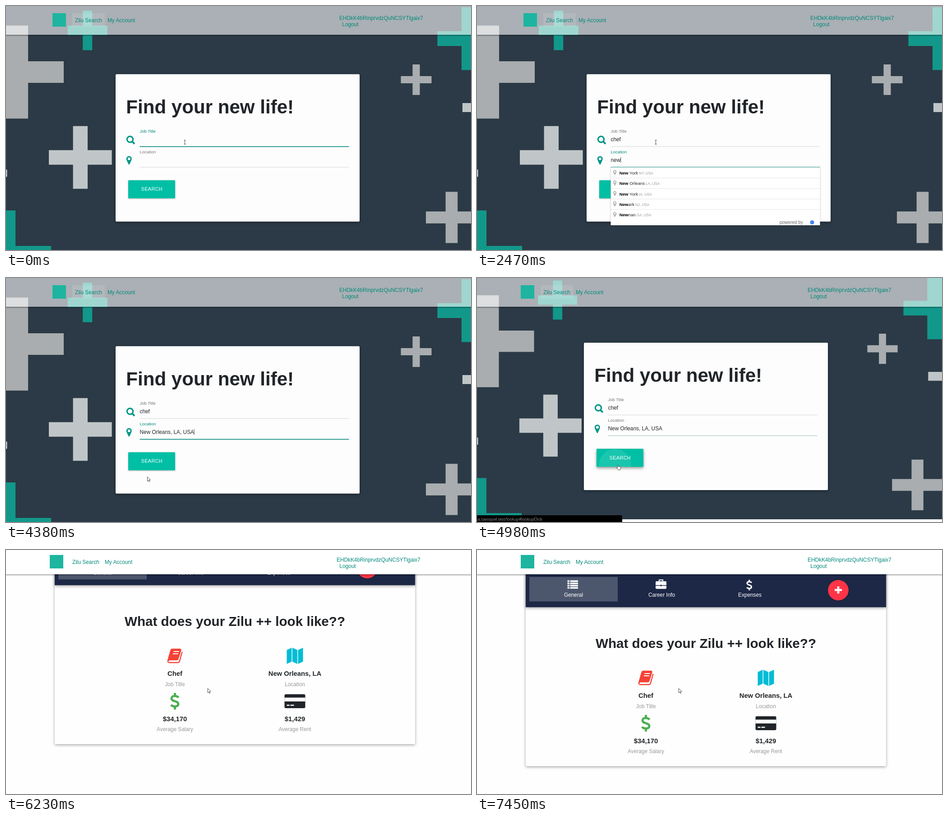
These frames come from a looping animation (1031x543 px, 8000 ms). An HTML page:

```html
<!DOCTYPE html>
<html lang="en">
<head>
<meta charset="utf-8">
<title>Job search walkthrough</title>
<style>
  html, body { margin: 0; width: 100%; height: 100%; overflow: hidden; background: #fefefe; }
  svg { display: block; width: 1031px; height: 543px; font-family: "Liberation Sans", Arial, sans-serif; }
  .card { filter: drop-shadow(0 2px 3px rgba(0, 0, 0, .35)); }
  .low { filter: drop-shadow(0 1.5px 1.5px rgba(0, 0, 0, .3)); }
  .high { filter: drop-shadow(0 3px 3px rgba(0, 0, 0, .4)); }
</style>
</head>
<body>
<svg id="stage" viewBox="0 0 1031 543"></svg>
<script>
const TEAL = '#00897b', INK = '#212529', GREY = '#a9adaf', PALE = '#c0c5c7', GREEN = '#12988a';
const BODY = 11.85, LOOP = 8000;

const rect = (x, y, w, h, fill, extra = '') =>
  `<rect x="${x}" y="${y}" width="${w}" height="${h}" fill="${fill}" ${extra}/>`;
const text = (x, y, str, size = BODY, fill = INK, extra = '') =>
  `<text x="${x}" y="${y}" font-size="${size}" fill="${fill}" ${extra}>${str}</text>`;
const centred = (x, y, str, size, fill, extra = '') =>
  text(x, y, str, size, fill, 'text-anchor="middle" ' + extra);
const group = (x, y, content, extra = '', scale = 1) =>
  `<g transform="translate(${x} ${y}) scale(${scale})" ${extra}>${content}</g>`;
const fillPath = (d, fill, extra = '') => `<path d="${d}" fill="${fill}" ${extra}/>`;
const line = (d, colour, width) => `<path d="${d}" fill="none" stroke="${colour}" stroke-width="${width}"/>`;
const BOLD = 'font-weight="700"';

// Icons
const pin = (x, y, colour, scale = 1) => group(x, y, fillPath(
  'M0 6a6 6 0 0 1 12 0c0 2.2-1 3.6-4.8 12q-1.2 1.8-2.4 0C1 9.6 0 8.2 0 6zM3 6a3 3 0 0 0 6 0a3 3 0 0 0-6 0z',
  colour, 'fill-rule="evenodd"'), '', scale);
const dollar = (x, y, colour, scale = 1) => group(x, y, line(
  'M8-8C4-13-7.5-13-7.5-6.5C-7.5 2 7.5-2 7.5 6.5C7.5 13.5-5 13-8.5 8M0-18.5v7M0 11.5v7', colour, 4.8), '', scale);
const book = (x, y) => group(x, y,
  fillPath('M-6-16H11q4 0 3 4L8 7q-1 3-4 3H-11q-3 0-4 3-2-2-1-5L-10-13q1-3 4-3z', '#f44336') +
  line('M-15 10q-2 5 3 5H7q2 0 3-2L16-9', '#f44336', 2.4) + line('M-3-9.5h12M-4.5-4.5h12', '#fff', 2.2));
const map = (x, y) => group(x, y, fillPath(
  'M-18-13L-7-18V13L-18 18zM-5.5-18L5.5-13V18L-5.5 13zM7-13L18-18V13L7 18z', '#00bcd4'));
const creditCard = (x, y) => rect(x, y, 46, 31, INK, 'rx="3"') + rect(x, y + 7.5, 46, 8.5, '#fefefe') +
  line(`M${x + 5} ${y + 24.5}h6M${x + 13} ${y + 24.5}h8`, '#fefefe', 2.6);
const list = (x, y) => [0, 5, 10, 15].map(d =>
  rect(x, y + d, 4.5, 3.6, '#fff') + rect(x + 6, y + d, 17.5, 3.6, '#fff')).join('');
const briefcase = (x, y) => rect(x, y + 4, 24, 17, '#fff', 'rx="2"') +
  line(`M${x + 8} ${y + 4}v-3h8v3`, '#fff', 2) +
  line(`M${x} ${y + 13.5}h9.5m5 0h9.5`, '#1d2846', 1.4) + rect(x + 10, y + 12, 4, 3, '#1d2846');

// Pointers
const pointers = {
  beam: 'M-2-4.5h4M0-4.5v9M-2 4.5h4',
  arrow: 'M0 0V9.6L2.2 7.6L3.7 11L5.2 10.3L3.8 7.1H6.8z',
  hand: 'M2.2 7V1q.9-1.4 1.8 0V4.6q1-.8 1.7.2 1-.6 1.6.4 1.2-.4 1.5.8V8.5L7.8 12H3.6L.4 8Q-.4 6 2.2 7z'
};
const pointer = ([kind, x, y]) =>
  group(x, y, `<path d="${pointers[kind]}" fill="#fff" stroke="#222" stroke-width=".8"/>`);

function nav(solid, dx, dy) {
  const height = 64 + 2 * dy;
  const links = (solid ? '' : rect(147, 16, 72, 30, '#fff', 'opacity=".1"')) +
    rect(103, 16, 30, 30, '#1db5a0') +
    text(153, 35.5, 'Zilu Search', BODY, TEAL) + text(225, 35.5, 'My Account', BODY, TEAL) +
    text(739, 31, 'EHDkK4bRinprvdzQuNCSYTlgaix7', BODY, TEAL) + text(745.3, 44.7, 'Logout', BODY, TEAL);
  return rect(0, 0, 1031, height, '#fff', `opacity="${solid ? 1 : .6}"`) +
    rect(0, height, 1031, 4, 'url(#fade)') + group(dx, solid ? -5 : 0, links);
}

const plus = (cx, cy, arm, half, colour) =>
  rect(cx - arm, cy - half, 2 * arm, 2 * half, colour) + rect(cx - half, cy - arm, 2 * half, 2 * arm, colour);

const backdrop = rect(0, 0, 1060, 549, '#2b3a46') +
  rect(0, 43.5, 49, 207, GREY) + rect(0, 123, 128, 48, GREY) +
  plus(180.7, 54.3, 44, 10.5, GREEN) + plus(164.8, 337, 69.8, 16.2, PALE) +
  plus(1026.5, 72.5, 70, 16.5, GREEN) + plus(909.5, 164, 34, 8, GREY) +
  plus(988, 470.5, 57, 13.3, GREY) + rect(1012, 216, 40, 20, PALE) + rect(0, 364, 2.5, 16, PALE) +
  rect(0, 455, 21, 94, GREEN) + rect(0, 534, 100, 15, GREEN);

function field(y, label, value, focused, settling) {
  const underline = focused ? rect(296.5, y + 33, 464, 1.8, '#1f9488')
    : rect(296.5, y + 33.2, 464, 1, settling ? '#8fbdb8' : '#d6d6d6');
  return text(296.5, y + 3.3, label, 9.45, focused ? TEAL : '#757575') + text(296.5, y + 22, value) + underline;
}

// Suggestion rows: place, region
const early = [['New York', 'NY'], ['Newark', 'NJ'], ['New Orleans', 'LA'], ['Newport Beach', 'CA'], ['Nevada', 'IA']];
const later = [['New York', 'NY'], ['New Orleans', 'LA'], ['New York', 'IA'], ['Newark', 'NJ'], ['Newnan', 'GA']];

function suggestions(rows, typed, chosen) {
  const items = rows.map(([place, region], i) => {
    const y = 359.5 + 23.35 * i, on = i === chosen;
    return (on ? rect(297, y, 463, 23.3, '#ebf2fe') : '') + (i ? rect(297, y - .5, 463, 1, '#e4e4e4') : '') +
      pin(302, y + 5.5, on ? '#f04a50' : '#b3b3b3', .6) +
      text(315.8, y + 15.3, `<tspan font-weight="700" fill="#000">${place.slice(0, typed)}</tspan>` +
        `<tspan>${place.slice(typed)}</tspan><tspan dx="2" font-size="8.15" fill="#999">${region}, USA</tspan>`, 9.63);
  }).join('');
  return rect(296.5, 359, 464, 129, '#fff', 'class="low"') + items +
    text(671, 485.3, 'powered by', 10, '#666') + '<circle cx="743" cy="481.5" r="4.5" fill="#4285f4"/>';
}

function searchPage(s) {
  const left = s.clicked ? -6 : 0, up = s.clicked ? -7.8 : 0;
  const form = rect(243, 151.7, 541, 328, '#fdfdfd', 'rx="2" class="card"') +
    text(266.3, 238.8, 'Find your new life!', 42.1, INK, BOLD) +
    '<circle cx="275" cy="296.8" r="6.6" fill="none" stroke="#009688" stroke-width="3.2"/>' +
    line('M279.8 301.6l5.2 5.2', '#009688', 3.8) + pin(266.8, 334, '#009688') +
    field(279, 'Job Title', s.job || '', s.focus === 1) +
    field(325, 'Location', s.place || '', s.focus === 2, s.clicked) +
    (s.caret ? rect(s.caret - .4, s.focus === 1 ? 290 : 336, .8, 13, '#333') : '') +
    rect(271, 387.7, 104, 40.3, '#00bfa5', `rx="1.5" class="${s.clicked ? 'high' : 'low'}"`) +
    (s.clicked ? '<circle cx="312" cy="424.5" r="36" fill="#fff" opacity=".1" clip-path="url(#button)"/>' : '') +
    text(299.5, 411.4, 'SEARCH', 10.9, '#fff', 'letter-spacing=".37"') +
    (s.rows ? suggestions(s.rows, s.typed, s.chosen) : '');
  const behind = s.clicked
    ? group(0, -4.6, backdrop, '', .9885) + rect(0, 537, 1031, 6, '#fefefe') : backdrop;
  return behind + group(left, up, form) + nav(false, left, 0);
}

function stat(x, y, label, value, shift) {
  return (value ? centred(x, y, value, 14.8, INK, BOLD) : '') + centred(x, y + 22.6 - shift, label, BODY, '#999');
}

function dashboard(s) {
  const gap = s.loaded ? 0 : 24, value = v => s.loaded ? v : '';
  const tab = (x, label) => centred(x, 104, label, BODY, '#fff');
  const content = rect(108, 0, 799, 481 - 2 * gap, '#fefefe', 'rx="3" class="card"') +
    rect(108, 0, 799, 127.3, '#1d2846', 'class="card"') + rect(116, 60, 196, 54.5, '#4c566d') +
    list(200.5, 67.5) + briefcase(396, 65.5) + dollar(603.7, 78, '#fff', .64) +
    tab(214, 'General') + tab(409.5, 'Career Info') + tab(605, 'Expenses') +
    '<circle cx="801" cy="89.5" r="22.8" fill="#ff3547" class="low"/>' +
    line('M793 89h16M801 81v16', '#fff', 4.6) +
    centred(507.5, 217.8, 'What does your Zilu ++ look like??', 29.65, INK, BOLD) +
    book(374.5, 284.5) + map(640.5, 284.5) +
    stat(374.5, 329, 'Job Title', value('Chef'), gap) +
    stat(640.5, 329, 'Location', value('New Orleans, LA'), gap) +
    group(0, -gap, dollar(374.5, 385.5, '#4caf50') + creditCard(617.5, 370) +
      stat(374.5, 429.8, 'Average Salary', value('$34,170'), gap) +
      stat(640.5, 429.8, 'Average Rent', value('$1,429'), gap));
  return rect(0, 0, 1031, 543, '#fefefe') +
    group(0, s.scroll, content, `opacity="${s.opacity}"`) + nav(true, -6, -5);
}

const statusBar = fillPath('M0 528H319q3 0 3 3V543H0z', '#000') +
  text(-2, 539.5, 'us.tavoquel.test/lookup#lookupClick', 8.65, '#999', 'font-family="Open Sans, sans-serif"');

const defs = `<defs><linearGradient id="fade" x2="0" y2="1"><stop stop-opacity=".35"/>
  <stop offset="1" stop-opacity="0"/></linearGradient>
  <clipPath id="button"><rect x="271" y="387.7" width="104" height="40.3"/></clipPath></defs>`;

const beam = ['beam', 396.5, 303], rest = ['arrow', 447.2, 308];
const job = 'chef', city = 'New Orleans, LA, USA';
const steps = [
  { at: 0, focus: 1, mouse: beam },
  { at: 640, focus: 1, job, caret: 319.4, mouse: beam },
  { at: 1260, focus: 2, job, caret: 297, mouse: beam },
  { at: 1880, focus: 2, job, place: 'ne', caret: 310, rows: early, typed: 2, mouse: beam },
  { at: 2470, focus: 2, job, place: 'new', caret: 318.8, rows: later, typed: 3, mouse: beam },
  { at: 3100, focus: 2, job, place: city, caret: 417.2, rows: later, typed: 3, chosen: 1, mouse: beam },
  { at: 3730, focus: 2, job, place: city, mouse: beam },
  { at: 4380, focus: 2, job, place: city, caret: 417.2, mouse: ['arrow', 313.5, 442.5] },
  { at: 4980, job, place: city, clicked: true, status: true, mouse: ['hand', 309.5, 415] },
  { at: 5600, page: dashboard, scroll: -49, opacity: .35, status: true, mouse: ['arrow', 311.8, 413.3] },
  { at: 6230, page: dashboard, scroll: -49, opacity: 1, loaded: true, mouse: rest },
  { at: 6840, page: dashboard, scroll: -18.4, opacity: 1, loaded: true, mouse: rest },
  { at: 7450, page: dashboard, scroll: 0, opacity: 1, loaded: true, mouse: rest }
];

const stage = document.getElementById('stage');
let shown;
function tick() {
  const now = performance.now() % LOOP;
  const step = steps.findLast(s => s.at <= now);
  if (step !== shown) {
    shown = step;
    stage.innerHTML = defs + (step.page || searchPage)(step) + (step.status ? statusBar : '') + pointer(step.mouse);
  }
  requestAnimationFrame(tick);
}
tick();
</script>
</body>
</html>
```
